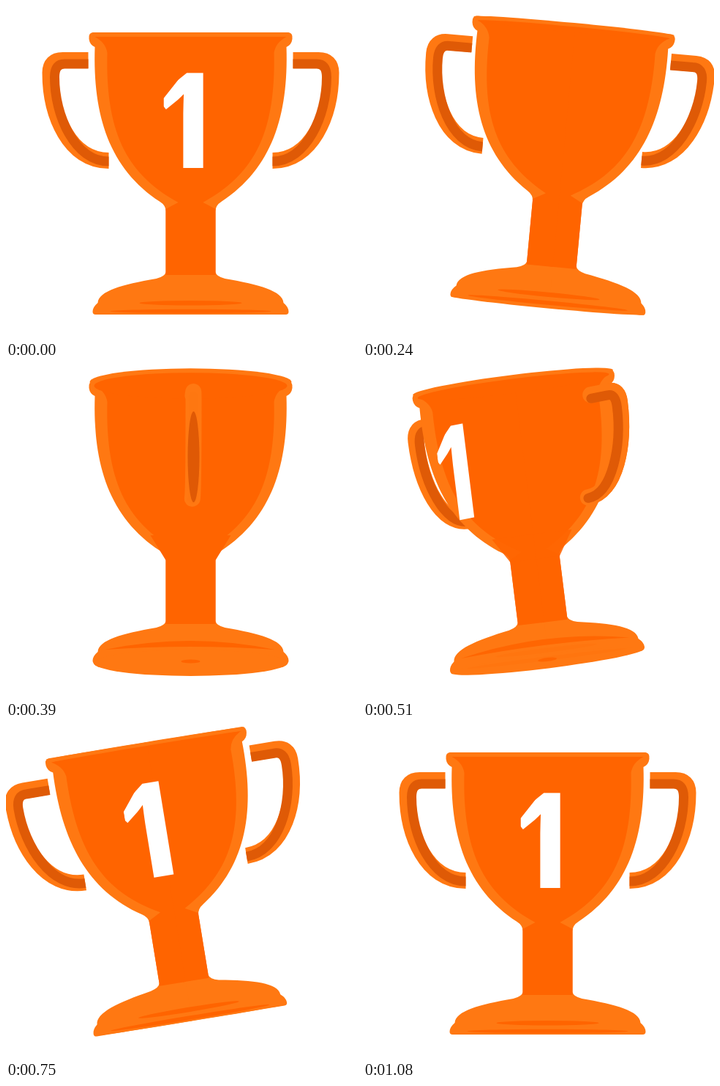
An HTML page without scripts that plays this animation: 480x453 px, repeating every 2.37 s.

```html
<!DOCTYPE html>
<html lang="en">
<head>
<meta charset="utf-8">
<title>Spinning trophy</title>
<style>
  @property --yaw  { syntax: "<angle>";  inherits: true; initial-value: 0deg; }
  @property --lean { syntax: "<angle>";  inherits: true; initial-value: 0deg; }
  @property --tip  { syntax: "<number>"; inherits: true; initial-value: 0; }
  @property --lift { syntax: "<length>"; inherits: true; initial-value: 0px; }

  html, body { margin: 0; width: 100%; height: 100%; overflow: hidden; background: #fff; }
  svg { display: block; }

  /* yaw: spin, lean: sideways tilt, tip: backward tilt (sine), lift: rise of the foot */
  @keyframes spin {
    0%     { --yaw: 0deg;     --lean: 0deg;    --tip: 0;    --lift: 0px;    animation-timing-function: steps(2); }
    2.53%  { --yaw: 25deg;    --lean: 1.3deg;  --tip: 0;    --lift: 2.5px;  animation-timing-function: steps(2); }
    5.06%  { --yaw: 70deg;    --lean: 3.5deg;  --tip: .01;  --lift: 6.5px;  animation-timing-function: steps(2); }
    7.59%  { --yaw: 120deg;   --lean: 5deg;    --tip: .02;  --lift: 10px;   animation-timing-function: steps(2); }
    10.12% { --yaw: 167deg;   --lean: 5.4deg;  --tip: .03;  --lift: 11.5px; animation-timing-function: steps(2); }
    12.65% { --yaw: 211deg;   --lean: 4.3deg;  --tip: .08;  --lift: 12px;   animation-timing-function: steps(3); }
    16.45% { --yaw: 271.2deg; --lean: 0deg;    --tip: .135; --lift: 15px;   animation-timing-function: steps(4); }
    21.51% { --yaw: 317.5deg; --lean: -7.1deg; --tip: .075; --lift: 17.5px; animation-timing-function: steps(4); }
    26.58% { --yaw: 343deg;   --lean: -9deg;   --tip: .03;  --lift: 18.5px; animation-timing-function: steps(4); }
    31.64% { --yaw: 356.7deg; --lean: -9.3deg; --tip: .01;  --lift: 18.5px; animation-timing-function: steps(6); }
    39.24% { --yaw: 361deg;   --lean: -8.8deg; --tip: 0;    --lift: 17px;   animation-timing-function: steps(2); }
    41.77% { --yaw: 360.7deg; --lean: -6deg;   --tip: 0;    --lift: 11px;   animation-timing-function: steps(2); }
    44.3%  { --yaw: 360.2deg; --lean: -1.5deg; --tip: 0;    --lift: 3px;    animation-timing-function: steps(1); }
    45.56%, 100% { --yaw: 360deg; --lean: 0deg; --tip: 0;   --lift: 0px; }
  }

  .cup {
    animation: spin 2370ms linear infinite;
    transform: translate(252.5px, calc(421px - var(--lift))) rotate(var(--lean)) translateY(-421px);
  }
  .light { fill: #ff7812; }
  .main  { fill: #ff6400; }

  /* ellipses that open as the cup tips back */
  .disc { transform: translateY(var(--y)) scaleY(var(--tip)); }

  .handles { transform: matrix(cos(var(--yaw)), calc(sin(var(--yaw)) * var(--tip)), 0, 1, 0, 0); }
  .tube path { fill: none; stroke: #ff7812; stroke-width: 22px; vector-effect: non-scaling-stroke; }
  .tube .core {
    stroke: #df5a06; stroke-width: 13px;
    opacity: calc(cos(var(--yaw)) * cos(var(--yaw)) * 12);
  }
  .front { stroke-linecap: round; }
  .front .left  { opacity: calc((sin(var(--yaw)) - .25) * 9); }
  .front .right { opacity: calc((-.25 - sin(var(--yaw))) * 9); }
  /* the core as it looks when a handle faces the viewer */
  .lens { fill: #df5a06; opacity: calc(1 - cos(var(--yaw)) * cos(var(--yaw)) * 12); }

  .digit {
    transform: matrix(cos(var(--yaw)), calc(sin(var(--yaw)) * var(--tip)), 0, 1,
      calc(sin(var(--yaw)) * 130), calc(cos(var(--yaw)) * var(--tip) * -130));
    opacity: calc(cos(var(--yaw)) * 8);
  }
  .digit text { font: 700 180.7px "Open Sans", "Noto Sans", sans-serif; fill: #fff; }

  .flat   { opacity: calc(1 - (var(--tip) - .04) * 25); }
  .curved { opacity: calc((var(--tip) - .04) * 25); }
</style>
</head>
<body>
<svg width="480" height="453">
  <defs>
    <g id="tube" class="tube">
      <path d="M-140 74H-175Q-192 74 -192 91C-192 150 -165 211 -112 211"/>
      <path class="core" d="M-140 79H-171Q-186 78 -186 97C-186 150 -158 212 -112 212"/>
    </g>
    <path id="shell" d="M-2 36H134Q140 37 139 45Q138 53 131 56C134 150 111 222 42 267Q34 272 34 280
      V363Q35 369 47 372C94 380 126 389 127 405Q134 411 134 417Q134 421 130 421H-2Z"/>
    <path id="bowl" d="M-2 42H131Q116 50 114 64C117 180 82 232 17 268L34 277V367H-2Z"/>
    <clipPath id="trim"><path d="M-10 88V92L-37 126V228H24V88Z"/></clipPath>
  </defs>

  <g class="cup">
    <g class="handles">
      <use href="#tube"/>
      <use href="#tube" transform="scale(-1 1)"/>
    </g>

    <g class="light">
      <use href="#shell"/>
      <use href="#shell" transform="scale(-1 1)"/>
      <circle class="disc" style="--y: 37px" r="138"/>
      <circle class="disc" style="--y: 420px" r="133"/>
    </g>

    <g class="main">
      <use href="#bowl"/>
      <use href="#bowl" transform="scale(-1 1)"/>
      <circle class="disc" style="--y: 42px" r="132"/>
      <g class="flat">
        <ellipse cy="405.3" rx="70" ry="3.2"/>
        <ellipse cy="416.5" rx="110" ry="2.8"/>
      </g>
      <g class="curved">
        <path d="M-55 246H55L34 280H-34Z"/>
        <path d="M-117 402Q0 378 115 402Q0 394 -117 402Z"/>
        <ellipse cy="418" rx="13" ry="2.5"/>
      </g>
    </g>

    <g class="digit">
      <text x="-57.6" y="221" clip-path="url(#trim)">1</text>
    </g>

    <g class="handles front">
      <use class="left" href="#tube"/>
      <use class="right" href="#tube" transform="scale(-1 1)"/>
    </g>
    <ellipse class="lens" cx="4" cy="139" rx="8" ry="62"/>
  </g>
</svg>
</body>
</html>
```
